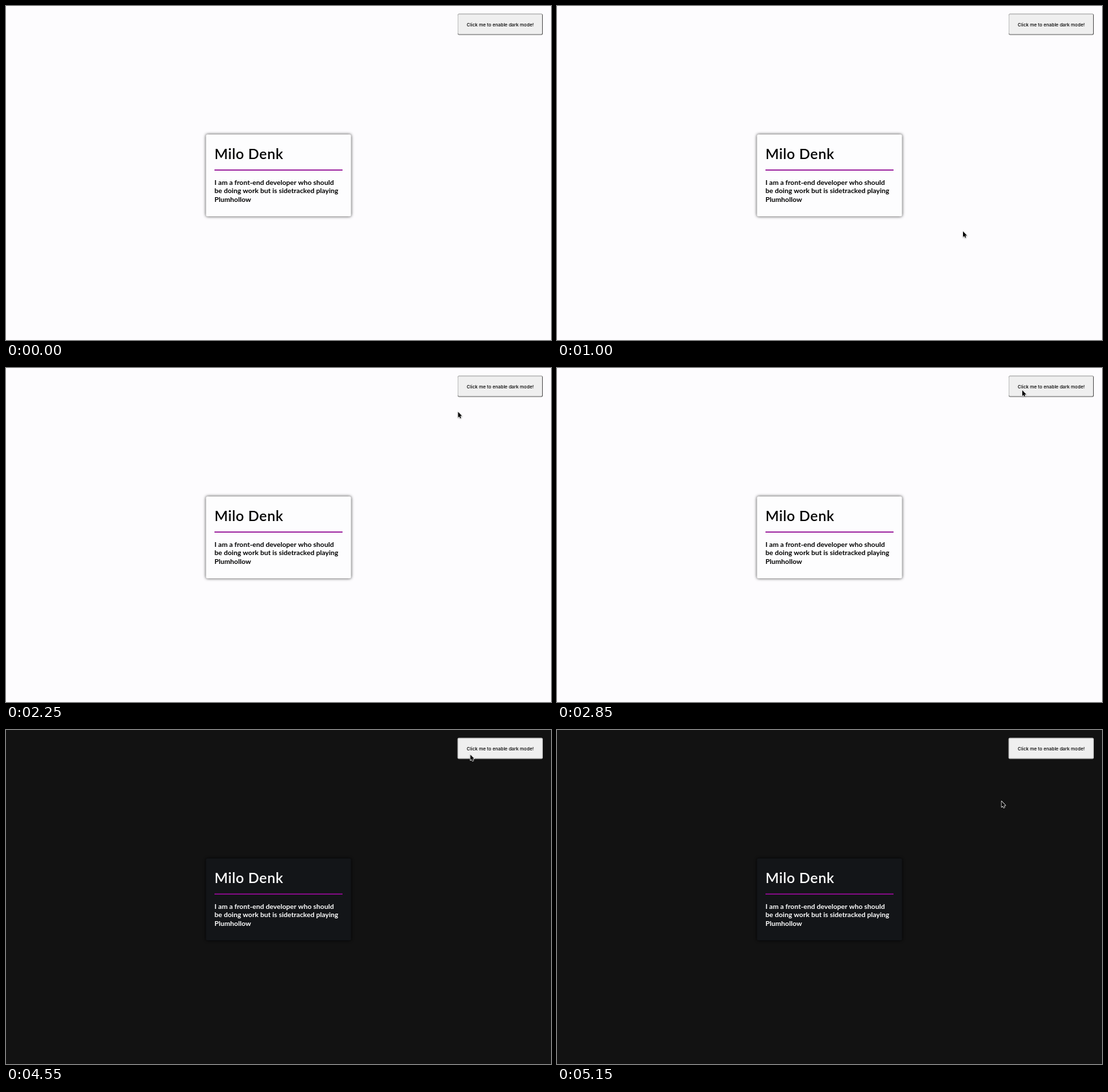
An HTML page with a canvas for the animation above (6600 ms loop, 800 px wide and 491 px high).

```html
<!DOCTYPE html>
<html lang="en">
<head>
<meta charset="utf-8">
<title>Dark mode card</title>
<style>
  html, body { margin: 0; width: 100%; height: 100%; overflow: hidden; }
  canvas { display: block; width: 800px; height: 491px; }
</style>
</head>
<body>
<canvas id="stage" width="800" height="491"></canvas>
<script>
const ctx = document.getElementById('stage').getContext('2d');
const LOOP = 6600, TICK = 50, DARK_AT = 3350;

const LIGHT = { page: '#fdfcfe', card: '#fdfdfe', text: '#000', shadow: '#333' };
const DARK = { page: '#121212', card: '#131518', text: '#fff', shadow: '#000' };
const RULE = '#920a94';

const easeOut = power => p => 1 - (1 - p) ** power;
const smooth = p => p * p * (3 - 2 * p);
const gentle = p => (p + smooth(p)) / 2;

// Each move runs from its first visible step to its last.
const moves = [
  { start: 600, end: 1000, from: [613, 491], to: [596, 331], ease: easeOut(2) },
  { start: 1400, end: 1800, from: [596, 331], to: [602, 165.5], ease: smooth },
  { start: 2100, end: 2750, from: [602, 165.5], to: [682.5, 33], ease: easeOut(4.3) },
  { start: 2850, end: 2850, from: [682.5, 33], to: [683, 32.5], ease: smooth },
  { start: 4550, end: 5150, from: [683, 32.5], to: [652.5, 104.5], ease: gentle }
];

function cursorAt(time) {
  const move = moves.filter(m => m.start <= time).pop();
  if (!move) return null;
  const p = Math.min(1, (time - move.start + TICK) / (move.end - move.start + TICK));
  const k = move.ease(p);
  return move.from.map((v, i) => v + (move.to[i] - v) * k);
}

function box(x, y, w, h, r, color) {
  ctx.fillStyle = color;
  ctx.beginPath();
  ctx.roundRect(x, y, w, h, r);
  ctx.fill();
}

function text(str, x, y, font, color, spacing = 0, align = 'left') {
  ctx.font = font;
  ctx.fillStyle = color;
  ctx.letterSpacing = spacing + 'px';
  ctx.textAlign = align;
  ctx.fillText(str, x, y);
}

function drawCard(theme) {
  ctx.save();
  ctx.shadowColor = theme.shadow;
  ctx.shadowBlur = 4;
  box(293.5, 188.7, 213, 120.6, 2.5, theme.card);
  ctx.restore();
  text('Milo Denk', 306, 225, '600 21px Lato, sans-serif', theme.text, 0.5);
  ctx.fillStyle = RULE;
  ctx.fillRect(306, 240.4, 188, 1.6);
  ['I am a front-end developer who should',
   'be doing work but is sidetracked playing',
   'Plumhollow'].forEach((line, i) =>
    text(line, 306, 263.2 + i * 12.2, '700 10.2px Lato, sans-serif', theme.text));
}

function drawButton(dark) {
  if (dark) {
    box(662.7, 11.4, 125.3, 31.1, 2, '#c4c4c4');
  } else {
    box(663, 11.6, 125, 31, 2, '#606060');
    box(663, 11.6, 124, 30, 2, '#c2c2c2');
  }
  box(664, 12.6, 122.8, 28.6, 1, '#efefef');
  text('Click me to enable dark mode!', 725.5, 29.7, '500 6.8px Inter, sans-serif', '#000', 0, 'center');
}

function drawCursor([x, y]) {
  const arrow = new Path2D('M0 0V8.4L1.9 6.7L3.1 9.5L4.5 8.9L3.3 6.1H5.9Z');
  ctx.save();
  ctx.translate(x, y + 0.3);
  ctx.strokeStyle = '#fff';
  ctx.lineWidth = 1.3;
  ctx.lineJoin = 'round';
  ctx.shadowColor = 'rgba(0, 0, 0, 0.35)';
  ctx.shadowBlur = 1.5;
  ctx.shadowOffsetY = 0.5;
  ctx.stroke(arrow);
  ctx.shadowColor = 'transparent';
  ctx.fillStyle = '#000';
  ctx.fill(arrow);
  ctx.restore();
}

function draw(time) {
  const dark = time >= DARK_AT;
  const theme = dark ? DARK : LIGHT;
  ctx.fillStyle = theme.page;
  ctx.fillRect(0, 0, 800, 491);
  drawCard(theme);
  drawButton(dark);
  const cursor = cursorAt(time);
  if (cursor) drawCursor(cursor);
}

let origin;
function frame(now) {
  origin ??= now;
  const time = (now - origin) % LOOP;
  draw(Math.floor(time / TICK) * TICK);
  requestAnimationFrame(frame);
}
requestAnimationFrame(frame);
</script>
</body>
</html>
```
